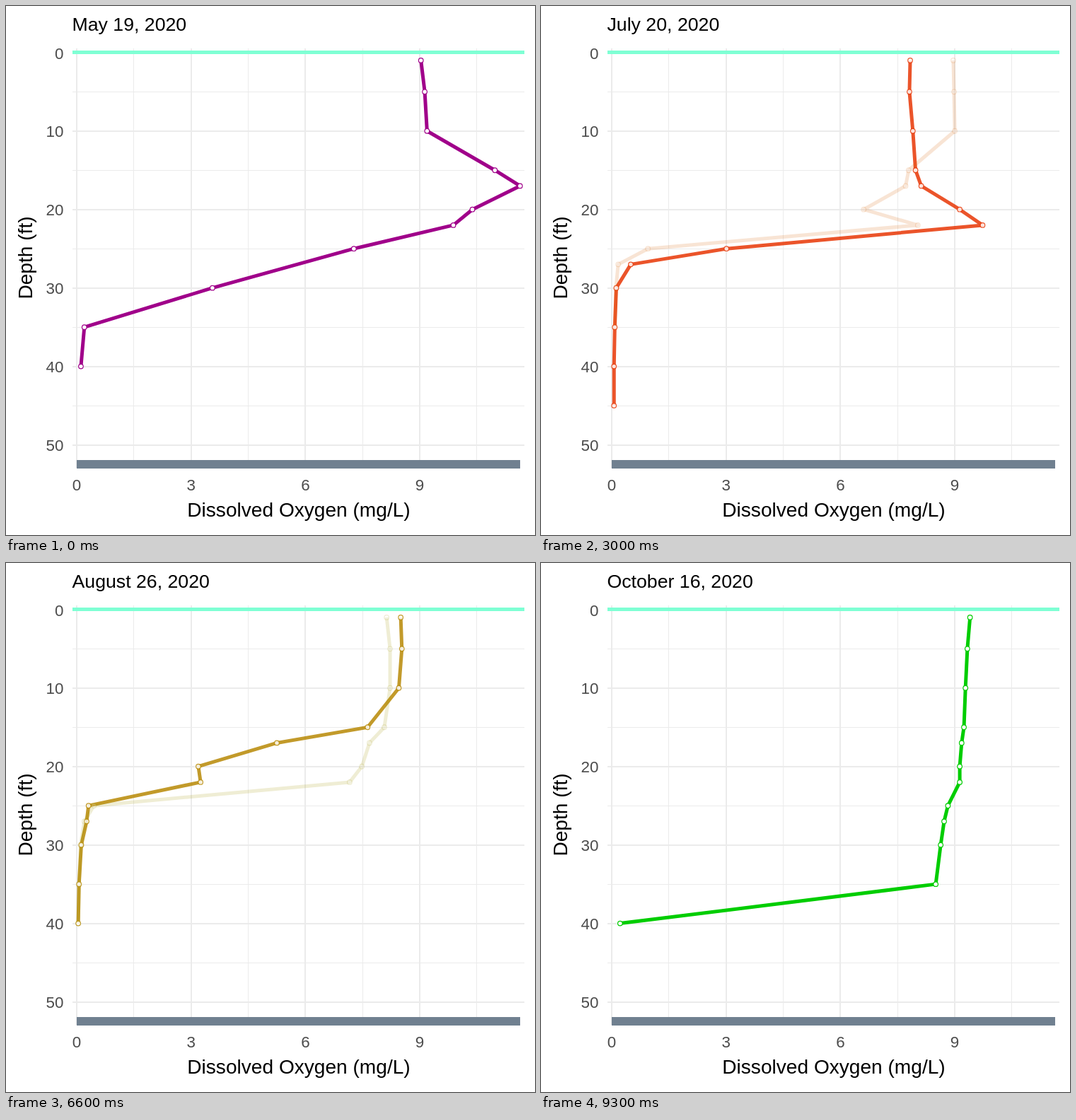
Recreate the animation shown at these times as an HTML page. Size 748 px wide and 748 px high, loop 10000 ms.

```html
<!DOCTYPE html>
<html lang="en">
<head>
<meta charset="utf-8">
<title>Dissolved oxygen by depth</title>
<style>
  html, body { margin: 0; width: 100%; height: 100%; overflow: hidden; background: #fff; }
  svg { display: block; width: 748px; height: 748px; }
  text { font-family: "Liberation Sans", Arial, sans-serif; fill: #000; white-space: pre; }
  .tick { font-size: 22.4px; fill: #4d4d4d; }
  .label { font-size: 28.1px; text-anchor: middle; }
  .grid { fill: #ebebeb; shape-rendering: crispEdges; }
  .line { fill: none; stroke-width: 5; stroke-linejoin: round; }
  .dots { fill: #fff; stroke-width: 1.2; }
</style>
</head>
<body>
<svg id="chart" viewBox="0 0 748 748"></svg>
<script>
const LOOP = 10000, TICK = 100;
const DEPTHS = [1, 5, 10, 15, 17, 20, 22, 25, 27, 30, 35, 40, 45];

// start: when the fade to this profile begins; steps: its length in ticks
const PROFILES = [
  { date: "May 19, 2020", color: "rgb(160,0,138)", start: 0, steps: 1,
    oxygen: [9.03, 9.13, 9.19, 10.97, 11.63, 10.38, 9.88, 7.27, null, 3.56, .2, .11] },
  { date: "June 22, 2020", color: "rgb(213,0,59)", start: 600, steps: 6,
    oxygen: [8.77, 8.79, 8.65, 8.62, 10.28, 10.38, 9.13, 6.71, null, .53, .12, .08, .08] },
  { date: "July 20, 2020", color: "rgb(231,51,0)", start: 1800, steps: 6,
    oxygen: [7.83, 7.81, 7.9, 7.97, 8.12, 9.13, 9.73, 3.01, .5, .12, .08, .06, .06] },
  { date: "August  4, 2020", color: "rgb(215,98,0)", start: 3000, steps: 6,
    oxygen: [8.96, 8.98, 9, 7.79, 7.71, 6.61, 8.03, .95, .17, .11, .08] },
  { date: "August 13, 2020", color: "rgb(203,115,0)", start: 4200, steps: 6,
    oxygen: [8.95, 8.84, 8.99, 8.5, 7.74, 5.29, 5.14, 1.2, .32, .12, .07, .06] },
  { date: "August 26, 2020", color: "rgb(182,135,0)", start: 5400, steps: 6,
    oxygen: [8.5, 8.53, 8.45, 7.63, 5.25, 3.19, 3.25, .31, .26, .12, .06, .04] },
  { date: "September 11, 2020", color: "rgb(160,151,0)", start: 6600, steps: 6,
    oxygen: [8.13, 8.22, 8.22, 8.07, 7.68, 7.48, 7.16, .45, .2, .1, .06, .04] },
  { date: "October  4, 2020", color: "rgb(102,189,0)", start: 7800, steps: 5,
    oxygen: [9.44, 9.35, 9.46, 8.91, 8.41, 8.61, 8.39, 8.48, 8.37, 7.54, .19, .12, .12] },
  { date: "October 16, 2020", color: "rgb(0,205,0)", start: 8900, steps: 5,
    oxygen: [9.4, 9.33, 9.28, 9.24, 9.18, 9.13, 9.13, 8.82, 8.72, 8.63, 8.5, .22] }
];

const panel = { left: 94, right: 733, top: 60, bottom: 653 };
const x = v => 100 + v * 53.9;
const y = d => 65.8 + d * 11.095;
const svg = document.getElementById("chart");

function add(tag, attrs, parent = svg) {
  const el = document.createElementNS("http://www.w3.org/2000/svg", tag);
  for (const key in attrs) el.setAttribute(key, attrs[key]);
  return parent.appendChild(el);
}

function label(str, attrs) {
  const el = add("text", attrs);
  el.textContent = str;
  return el;
}

function rect(left, top, width, height, attrs) {
  add("rect", { x: left, y: top, width, height, ...attrs });
}

function gridX(v, w) {
  rect(Math.round(x(v) - w / 2), panel.top, w, panel.bottom - panel.top, { class: "grid" });
}

function gridY(d, w) {
  rect(panel.left, Math.round(y(d) - w / 2), panel.right - panel.left, w, { class: "grid" });
}

for (let d = 5; d < 50; d += 10) gridY(d, 1);
for (let v = 1.5; v < 11; v += 3) gridX(v, 1);
for (let d = 0; d <= 50; d += 10) {
  gridY(d, 2);
  label(d, { class: "tick", x: 81.5, y: y(d) + 8.7, "text-anchor": "end" });
}
for (let v = 0; v <= 9; v += 3) {
  gridX(v, 2);
  label(v, { class: "tick", x: x(v), y: 685, "text-anchor": "middle" });
}

label("Dissolved Oxygen (mg/L)", { class: "label", x: 414, y: 722 });
label("Depth (ft)", { class: "label", transform: "translate(37 356) rotate(-90)" });
const title = label("", { x: 93.5, y: 35, "font-size": 26.7 });

rect(panel.left, 63, panel.right - panel.left, 5, { fill: "#7fffd4" });
rect(100, 642, 627, 12, { fill: "#708090", "shape-rendering": "crispEdges" });

const lines = add("g", {});
const dots = add("g", {});
for (const p of PROFILES) {
  const pts = p.oxygen
    .map((v, i) => v === null ? null : [x(v), y(DEPTHS[i])])
    .filter(Boolean);
  p.line = add("polyline", { class: "line", stroke: p.color, points: pts.join(" ") }, lines);
  p.dots = add("g", { class: "dots", stroke: p.color }, dots);
  for (const [cx, cy] of pts) add("circle", { cx, cy, r: 3.3 }, p.dots);
}

function setAlpha(p, a) {
  const shown = a > 0 ? "visible" : "hidden";
  p.line.setAttribute("visibility", shown);
  p.dots.setAttribute("visibility", shown);
  p.line.setAttribute("stroke-opacity", a);
  p.dots.setAttribute("stroke-opacity", a);
  p.dots.setAttribute("fill-opacity", a);
}

function draw(ms) {
  const time = Math.floor((ms % LOOP) / TICK) * TICK;
  const current = PROFILES.findLastIndex(p => time >= p.start);
  const { start, steps } = PROFILES[current];
  const mix = Math.min(1, ((time - start) / TICK + 1) / steps);
  PROFILES.forEach((p, i) =>
    setAlpha(p, i === current ? mix : i === current - 1 ? 1 - mix : 0));
  title.textContent = PROFILES[mix > .5 ? current : current - 1].date;
}

let origin;
function loop(now) {
  origin ??= now;
  draw(Math.max(0, now - origin));
  requestAnimationFrame(loop);
}
draw(0);
requestAnimationFrame(loop);
</script>
</body>
</html>
```
